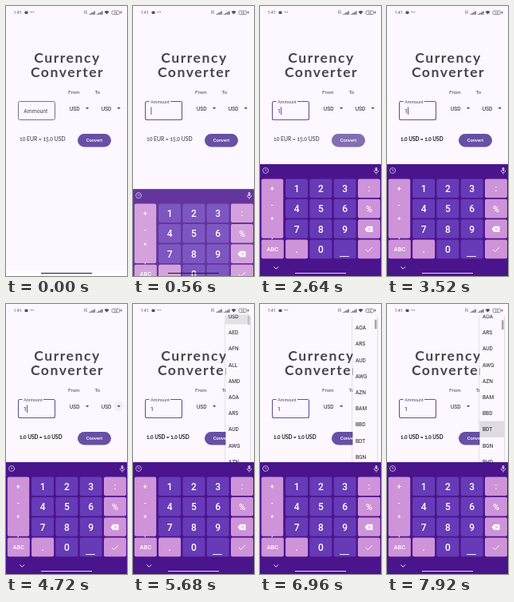
An HTML page for the animation above (8 s loop, 152 px wide and 338 px high).

```html
<!DOCTYPE html>
<html lang="en">
<head>
<meta charset="utf-8">
<title>Currency converter</title>
<style>
html, body { margin: 0; width: 100%; height: 100%; overflow: hidden; background: #fdf7ff; }
svg { display: block; width: 152px; height: 338px; font: 7px Roboto, sans-serif; fill: #1d1b20; }
.lato { font-family: Lato, sans-serif; font-variant-numeric: oldstyle-nums; }
.mid { text-anchor: middle; }
.line { fill: none; stroke-width: .9; stroke-linecap: round; stroke-linejoin: round; }
</style>
</head>
<body>
<svg viewBox="0 0 152 338">
  <defs>
    <clipPath id="menuClip"><rect id="menuWindow" x="116.5" y="13.5" width="30.5" height="184.5" rx="1.5"/></clipPath>
    <filter id="shadow" x="-30%" width="160%"><feDropShadow dx="0" dy="1" stdDeviation="1.2" flood-opacity=".3"/></filter>
  </defs>
  <rect width="152" height="338" fill="#fdf7ff"/>

  <g fill="#55505a" font-size="5.4">
    <text x="9.5" y="10">1:41</text>
    <rect x="23.5" y="6.5" width="4" height="3.5" rx="1"/>
    <text x="30" y="9.5">•••</text>
    <text x="98" y="7.8" font-size="2.6">0.4</text><text x="98" y="10.3" font-size="2.6">K/s</text>
    <g id="signal"></g>
    <path d="M123.5 7.2q3-2.4 6 0l-3 3.3z"/>
    <rect x="133" y="6" width="9.5" height="4.6" rx="1.3" fill="none" stroke="#55505a" stroke-width=".6"/>
    <text class="mid" x="137.7" y="9.9" font-size="4.2">90</text>
    <path d="M144.3 6l-1 2.6h1.4l-.5 2 1.8-3h-1.4z"/>
  </g>

  <g class="lato mid" font-size="17.6" font-weight="700" letter-spacing="1.5" fill="#4a4551">
    <text x="77" y="70.5">Currency</text>
    <text x="77" y="88.7">Converter</text>
  </g>
  <g class="lato" font-size="6.5" fill="#49454f">
    <text x="78" y="110">From</text>
    <text x="111.5" y="110">To</text>
  </g>

  <rect id="field" x="15.5" y="119.5" width="46" height="23" rx="2" fill="none"/>
  <rect id="gap" x="20.5" y="118" width="26.5" height="3" fill="#fdf7ff"/>
  <text id="label">Ammount</text>
  <text id="amount" x="22" y="134">1</text>
  <rect id="caret" y="126.5" width="1" height="9.5" fill="#6750a4"/>

  <text x="80" y="131" font-size="6.6">USD</text>
  <path d="M100 127h4.2l-2.1 2.2z" fill="#49454f"/>
  <circle id="arrowTap" cx="141.5" cy="127.6" r="6.3" opacity="0"/>
  <text x="119.7" y="131" font-size="6.6">USD</text>
  <path d="M139.6 127h4.2l-2.1 2.2z" fill="#49454f"/>

  <text id="result" class="lato" x="17" y="169"></text>
  <rect x="90" y="160" width="42" height="16.4" rx="8.2" fill="#6750a4"/>
  <rect id="press" x="90" y="160" width="42" height="16.4" rx="8.2" fill="#fff"/>
  <text class="mid" x="111" y="170.4" font-size="5.9" font-weight="500" fill="#fff">Convert</text>
  <rect y="331" width="152" height="7" fill="#fefdff"/>

  <g id="menu">
    <rect id="sheet" x="116.5" y="13.5" width="30.5" height="184.5" rx="1.5" fill="#fdf8ff" filter="url(#shadow)"/>
    <g clip-path="url(#menuClip)">
      <g id="list"></g>
      <rect id="thumb" x="144" width="2.6" height="11.5" fill="#aaa5ad"/>
    </g>
  </g>

  <g id="keyboard"></g>
  <rect id="handle" x="44" y="334" width="64" height="1"/>
</svg>
<script>
const $ = id => document.getElementById(id);
const set = (id, attrs) => { for (const k in attrs) $(id).setAttribute(k, attrs[k]); };
const ramp = (t, a, b) => Math.min(1, Math.max(0, (t - a) / (b - a)));
const ease = (t, a, b) => 1 - (1 - ramp(t, a, b)) ** 2;
const rect = (x, y, w, h, fill) => `<rect x="${x}" y="${y}" width="${w}" height="${h}" rx="2" fill="${fill}"/>`;
const label = (x, y, s, size) => `<text class="mid" x="${x}" y="${y + size * .36}" font-size="${size}" font-weight="500">${s}</text>`;
const line = d => `<path class="line" stroke="#fff" d="${d}"/>`;

const PINK = "#ce93d8", VIOLET = "#673ab7", ROW = 20.2;
const CODES = "USD AED AFN ALL AMD AOA ARS AUD AWG AZN BAM BBD BDT BGN BHD BIF".split(" ");

function signalBars() {
  let s = "";
  for (const x of [104.5, 114])
    for (let i = 0; i < 4; i++) s += `<rect x="${x + i * 2}" y="${9.8 - i * 1.1}" width="1.3" height="${1 + i * 1.1}"/>`;
  return s;
}

function keyboard() {
  const col = c => 1.8 + c * 30.3, row = r => 216.4 + r * 25.4;
  const key = (c, r, fill, s = "", size = 12) =>
    rect(col(c), row(r), 28, 23.6, fill) + label(col(c) + 14, row(r) + 12, s, size);
  let s = `<rect y="198" width="152" height="140" fill="#4a148c"/><g fill="#fff">`;
  s += rect(col(0), row(0), 27.4, 74.4, PINK);
  ["+", "-", "*", ","].forEach((c, i) => s += label(15.2, 229 + i * 19.6, c, 9));
  for (let i = 0; i < 9; i++) s += key(1 + i % 3, Math.floor(i / 3), VIOLET, i + 1);
  s += key(0, 3, PINK, "ABC", 7.6) + key(1, 3, PINK, ".") + key(2, 3, VIOLET, 0) + key(3, 3, VIOLET);
  s += key(4, 0, PINK, ":", 11) + key(4, 1, PINK, "%", 11) + key(4, 2, PINK) + key(4, 3, PINK);
  s += line("M100.5 313.5h11M133 305l2.6 2.6 5.4-5.4");
  s += `<path d="M131.5 279.4l3-3.7h7v7.4h-7z"/><path class="line" stroke="${PINK}" d="M136 277.9l3 3m0-3l-3 3"/>`;
  s += `<g opacity=".7">${line("M10.6 206a3.5 3.5 0 1 1-7 0a3.5 3.5 0 1 1 7 0M7 204.6v1.6h.8")}
    <rect x="144.6" y="202" width="2.8" height="5" rx="1.4"/>${line("M143.2 206q0 2.8 2.8 2.8t2.8-2.8M146 209v1.5")}</g>`;
  s += `<g id="tools">`;
  [24, 41, 58.5, 75.5, 93, 110].forEach((x, i) => {
    s += i ? rect(x - 3, 203.2, 6.2, 5.6, "#d6c4e8") + `<path class="line" stroke="#4a148c" d="M${x - 1.3} 206h2.6"/>`
           : line(`M${x + 3} 206a3 3 0 1 1-6 0a3 3 0 1 1 6 0M${x - 1.2} 206.7q1.2 1 2.4 0`);
  });
  s += [125.2, 128, 130.8].map(x => `<circle cx="${x}" cy="206" r=".8"/>`).join("");
  return s + `</g>${line("M17.6 326.6l2.6 2.6 2.6-2.6")}</g>`;
}

$("signal").innerHTML = signalBars();
$("keyboard").innerHTML = keyboard();
$("list").innerHTML = CODES.map((c, i) => {
  const y = 27.8 + i * ROW, id = { USD: "chosen", BDT: "tapped" }[c];
  return (id ? `<rect id="${id}" x="116" y="${y - ROW / 2}" width="32" height="${ROW}" fill="#1d1b20" opacity=".11"/>` : "") +
    `<text x="120" y="${y + 2.7}" font-size="6.6">${c}</text>`;
}).join("");

// Times at which the caret toggles, starting hidden.
const BLINKS = [160, 640, 1120, 1840, 2320, 2800, 3360, 3840, 4320, 5200];

function draw(t) {
  const focus = ramp(t, 80, 240), typed = t >= 1280;
  set("field", { stroke: focus ? "#6750a4" : "#79747e", "stroke-width": 1 + .1 * focus });
  set("gap", { opacity: focus });
  set("label", { x: 22.3, y: 133.5 - 12 * focus, "font-size": 6.8 - 1.5 * focus, fill: focus ? "#54457f" : "#49454f" });
  set("amount", { opacity: +typed });
  set("caret", { x: typed ? 26 : 22.4, opacity: BLINKS.filter(b => t >= b).length % 2 });

  const rise = ease(t, 400, 720);
  set("keyboard", { transform: `translate(0 ${(140 * (1 - ramp(t, 400, 720)) ** 2.15).toFixed(2)})`, opacity: Math.min(1, rise * 1.13) });
  set("tools", { opacity: ramp(t, 880, 1120) * (1 - ramp(t, 1240, 1360)) });
  set("handle", { fill: t < 720 ? "#1d1b20" : "#e6dcf0" });

  set("press", { opacity: .17 * ramp(t, 2400, 2640) * (1 - ramp(t, 2960, 3280)) });
  const converted = t >= 3440;
  $("result").textContent = converted ? "1.0 USD = 1.0 USD" : "10 EUR = 15.0 USD";
  set("result", { "font-weight": converted ? 700 : 400, "font-size": converted ? 6.5 : 6.8, fill: converted ? "#1d1b20" : "#36323a" });
  set("arrowTap", { opacity: t >= 4720 && t < 4880 ? .04 : 0 });

  const open = ease(t, 5120, 5360);
  const scroll = 40.4 * ease(t, 5600, 6080) + 41 * ease(t, 6320, 6640) + 32 * ease(t, 6880, 7120);
  const top = 13.5 * open + 115 * (1 - open), height = 184.5 * open + 24 * (1 - open);
  set("menu", { opacity: open });
  for (const id of ["sheet", "menuWindow"]) set(id, { y: top, height });
  set("list", { transform: `translate(0 ${-scroll})` });
  set("thumb", { y: 14 + scroll * .0565, opacity: ramp(t, 5600, 5760) });
  set("tapped", { opacity: .13 * ramp(t, 7520, 7920) });
}

function tick() {
  draw(performance.now() % 8000);
  requestAnimationFrame(tick);
}
tick();
</script>
</body>
</html>
```
